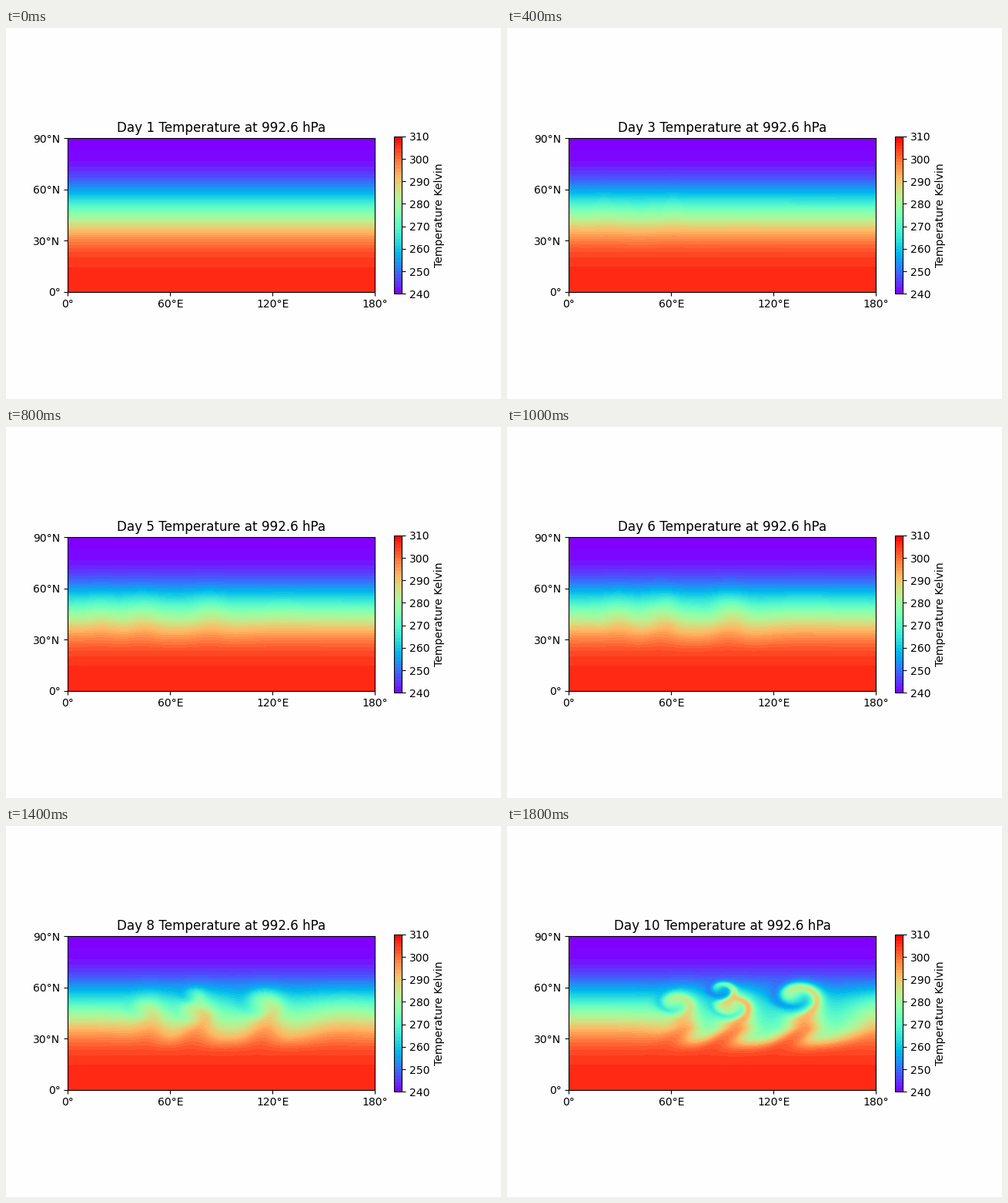
A matplotlib script for the animation above (2 s loop, 643x482 px).

```python
import numpy as np
import matplotlib.pyplot as plt
from matplotlib.animation import FuncAnimation

DAYS = 10
LEVELS = np.linspace(240, 310, 50)
LON, LAT = np.meshgrid(np.linspace(0, 180, 181), np.linspace(0, 90, 91))

# Vortices on the last day: lon, lat, lon speed, lat speed, turn (deg), radius
VORTICES = [
    (133, 54.5, 10.5, 2, 190, 12),
    (89, 58.5, 8.5, 1.5, 200, 7),
    (95, 49, 10.5, 2, 200, 10),
    (62, 50.5, 9.5, 2, 150, 9),
]
# Warm ridges on the last day: lon, lon speed, width, northward lift
RIDGES = [
    (138, 11, 10, 9),
    (98, 11, 10, 9),
    (67, 9.5, 9, 6),
    (186, 12, 21, 3),
]


def zonal_temperature(lat):
    """Moist balanced state near the surface, 310 K equator to 240 K pole."""
    lat = np.clip(lat, 0, 90)
    c = np.cos(np.radians(lat))
    tilt = c**3 - 0.6 * c**5
    virtual = 1 / (0.0041704 - 0.0023522 * tilt)
    vapour = 0.018 * np.exp(-(lat / 40) ** 4)
    return virtual / (1 + 0.608 * vapour)


def sigmoid(x):
    return 1 / (1 + np.exp(-x))


def growth(day):
    return max(0, np.exp(-0.62 * (DAYS - day)) - 0.008)


def band(y, centre, south, north):
    """Bell in latitude with its own width on each side."""
    return np.exp(-((y - centre) / np.where(y < centre, south, north)) ** 2)


def unwind(x, y, cx, cy, turn, radius, flat=1.5):
    """Turn points back clockwise about a flattened vortex."""
    dx, dy = x - cx, (y - cy) * flat
    angle = np.radians(turn) * np.exp(-(np.hypot(dx, dy) / radius) ** 3)
    c, s = np.cos(angle), np.sin(angle)
    return cx + dx * c + dy * s, cy + (dy * c - dx * s) / flat


def source_shift(x, y, day):
    """Northward offset of the air's origin: cold troughs minus warm ridges."""
    back, grow = DAYS - day, growth(day)
    lean = 1.2 * grow * np.minimum(y - 36, 0)
    ridge = lift = 0
    for lon, speed, width, height in RIDGES:
        bell = np.exp(-((x - lon - lean + speed * back) / width) ** 2)
        ridge = ridge + bell
        lift = lift + height * bell
    west = sigmoid((x - 66 + 9 * back) / 7)
    east = sigmoid((200 - 18 * back - x) / 10)
    trough = 14 * grow**0.75 * west * east * (1 - np.minimum(ridge, 1))
    return trough * band(y, 31, 7, 18) - grow**0.5 * lift * band(y, 50, 16, 9)


def temperature(day):
    x, y = LON, LAT
    back = DAYS - day
    for lon, lat, vx, vy, turn, radius in VORTICES:
        x, y = unwind(x, y, lon - vx * back, lat - vy * back,
                      turn * growth(day), radius)
    return zonal_temperature(y + source_shift(x, y, day))


def draw_field(day):
    return ax.contourf(LON, LAT, temperature(day), LEVELS, cmap="rainbow")


plt.rcParams.update({"font.family": "DejaVu Sans", "font.size": 10.05})
fig, ax = plt.subplots(figsize=(6.43, 4.82), dpi=100, facecolor="#fefefe")
fig.subplots_adjust(top=0.8815)
ax.set_aspect("equal")
ax.set_facecolor("#8000ff")
field = draw_field(1)
ax.set(xlim=(0, 180), ylim=(0, 90))
ax.set_xticks([0, 60, 120, 180], ["0°", "60°E", "120°E", "180°"])
ax.set_yticks([0, 30, 60, 90], ["0°", "30°N", "60°N", "90°N"])
bar = fig.colorbar(field, ax=ax, shrink=0.55, ticks=range(240, 311, 10))
bar.set_label("Temperature Kelvin")


def update(i):
    global field
    field.remove()
    field = draw_field(i + 1)
    ax.set_title(f"Day {i + 1} Temperature at 992.6 hPa")
    return [field]


anim = FuncAnimation(fig, update, frames=DAYS, interval=200, repeat=True)
plt.show()
```
